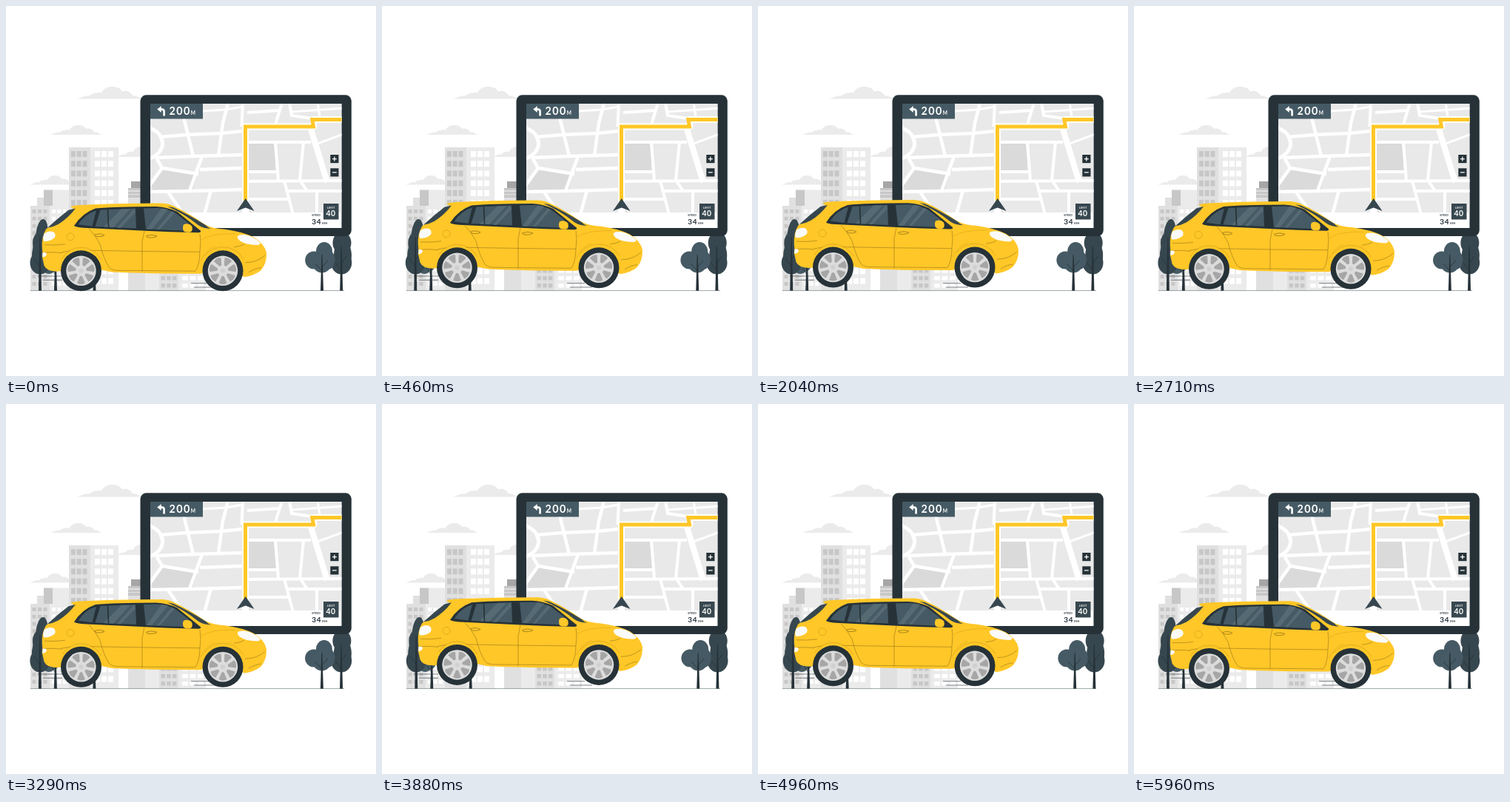
An HTML page with a canvas that plays this animation: 500 px wide and 500 px high, repeating every 6000 ms.

```html
<!DOCTYPE html>
<html lang="en">
<head>
<meta charset="utf-8">
<title>Navigation</title>
<style>
  html, body { margin: 0; width: 100%; height: 100%; overflow: hidden; background: #fff; }
  canvas { display: block; width: 100vmin; height: 100vmin; }
</style>
</head>
<body>
<canvas id="stage"></canvas>
<script>
const canvas = document.getElementById('stage');
const ctx = canvas.getContext('2d');
const LOOP = 6000, BOUNCE = 1500, LIFT = 6.5, REST = 0.8;
const SHAKE = [0, -1, 2, -4, 4, -4, 4, -4, 2, -1, 0];
const INK = '#263238', SLATE = '#37474f', STEEL = '#455a64', YELLOW = '#ffc727';
const G1 = '#ebebeb', G2 = '#e0e0e0', G3 = '#c7c7c7', G4 = '#a6a6a6';
const FONT = 'Lato, "Open Sans", sans-serif';

function rect(x, y, w, h, color) {
  ctx.fillStyle = color;
  ctx.fillRect(x, y, w, h);
}
function shape(d, color) {
  ctx.fillStyle = color;
  ctx.fill(new Path2D(d));
}
function line(d, color, width = 0.6) {
  ctx.strokeStyle = color;
  ctx.lineWidth = width;
  ctx.stroke(new Path2D(d));
}
function oval(x, y, rx, ry, color, tilt = 0) {
  ctx.fillStyle = color;
  ctx.beginPath();
  ctx.ellipse(x, y, rx, ry, tilt, 0, Math.PI * 2);
  ctx.fill();
}
function text(s, x, y, size, color, gap = 0) {
  ctx.font = `700 ${size}px ${FONT}`;
  ctx.letterSpacing = gap + 'px';
  ctx.fillStyle = color;
  ctx.fillText(s, x, y);
}
function panes(x, y, cols, rows, w, h, dx, dy, color) {
  for (let r = 0; r < rows; r++)
    for (let c = 0; c < cols; c++) rect(x + c * dx, y + r * dy, w, h, color);
}

function cloud(x, y, w, h) {
  ctx.save();
  ctx.translate(x, y);
  ctx.scale(w, h);
  shape('M0 0C.08-.1 .12-.3 .2-.25C.25-.5 .33-.55 .38-.5C.42-.85 .48-1 .56-1' +
    'C.65-1 .68-.75 .71-.62C.78-.72 .84-.55 .86-.28C.92-.28 .97-.12 1 0Z', G1);
  ctx.restore();
}

function city() {
  cloud(95.5, 125.5, 87.5, 16.5);
  cloud(59.5, 174, 69, 13);
  cloud(149, 204, 60, 14);
  cloud(32, 241.5, 62, 12.5);

  rect(42, 259, 12, 12, G2);
  rect(51, 248.5, 12, 22, G3);
  rect(63, 248.5, 22, 40, G1);
  rect(33, 270, 26, 114.5, G2);
  rect(59, 270, 26, 114.5, G1);
  panes(35.5, 275, 3, 11, 5, 5, 7.5, 9.8, G3);
  panes(62, 275, 3, 11, 5, 5, 7.5, 9.8, '#fff');

  rect(85, 191, 29, 193.5, G2);
  rect(114, 191, 38, 193.5, G1);
  panes(88, 196, 3, 14, 5.8, 8, 7.8, 13.2, G3);
  panes(120, 196, 3, 14, 7, 8, 9, 13.2, '#fff');

  rect(169, 237, 26, 9, G4);
  rect(165, 246, 23, 138.5, G2);
  rect(165, 246, 30, 3, G3);
  rect(165, 251, 30, 8, G3);
  rect(165, 254, 30, 1.2, G2);
  rect(188, 262, 19, 122.5, G1);
  rect(207, 330, 26, 54.5, G2);
  rect(233, 330, 37, 54.5, G1);
  panes(209.5, 335, 3, 5, 5.5, 5.5, 7.7, 10, G3);
  panes(238, 335, 3, 5, 8, 5.5, 10.5, 10, '#fff');
}

function map() {
  rect(195, 132, 258.5, 168, '#fff');
  ctx.save();
  ctx.beginPath();
  ctx.rect(195, 132, 258.5, 168);
  ctx.clip();
  rect(195, 132, 258.5, 147, '#e9e9e9');
  shape('M212 221L258 229L252 249L198 249L197 243Z', '#dadada');
  shape('M328 185L362 185L365 222L328 222Z', '#dadada');

  ctx.lineJoin = 'round';
  line('M190 208C211 201 215 187 209 177C207 171 201 167 190 163', '#fff', 5);
  line('M208 177L243 174L290 172L320 169', '#fff', 4.5);
  line('M240 150L253 203', '#fff', 4.5);
  line('M203 205L253 203L320 201', '#fff', 4.5);
  line('M203 205L211 219M265 203L248 250', '#fff', 4.5);
  line('M190 248L211 219L260 227M262 221L320 219', '#fff', 4.5);
  line('M190 251L252 250L320 248M277 249L268 282', '#fff', 4.5);
  line('M218 250L240 282M300 131L293 158L287 202', '#fff', 4.5);
  line('M265 142L298 140L320 136', '#fff', 3);
  line('M320 130L318.5 163', '#fff', 4);
  line('M323.5 160V282', '#fff', 9);
  line('M319 163H416V153.5H456', '#fff', 9);
  line('M323 184H412M328 224L366 224M323 237L456 236', '#fff', 4);
  line('M364 184L368 236M402 184L397 236', '#fff', 4);
  line('M411 163L434 238', '#fff', 8);
  line('M373 131L363 163M383 131L386 148L414 152M326 144L370 141', '#fff', 4);
  line('M421 186L456 173M386 143L456 138M421 131L424 150', '#fff', 3);
  line('M323 261L382 261M376 236L388 282M380 250L456 250', '#fff', 4);
  line('M420 250V282M399 238L407 250', '#fff', 4);
  ctx.lineJoin = 'miter';
  line('M323.5 266V163H415.5L413.8 153.6H455', YELLOW, 5);
  ctx.restore();
  shape('M323.7 260L335.5 277L323.7 272.5L312 277Z', SLATE);
}

function screen() {
  ctx.fillStyle = INK;
  ctx.beginPath();
  ctx.roundRect(181.5, 120.3, 285.3, 190.7, 8);
  ctx.fill();
  map();

  rect(195, 132, 71, 20.5, STEEL);
  ctx.lineJoin = 'round';
  line('M213.6 148.5V142.5Q213.6 139.6 210.5 139.6H208', '#fff', 2.6);
  shape('M204.2 139.6L209.8 135.2V144Z', '#fff');
  ctx.lineJoin = 'miter';
  text('200', 220.6, 147.3, 14.4, '#fff', 1.4);
  text('M', 249.8, 147.3, 6.6, '#fff');

  rect(438.3, 201, 11.2, 11.2, INK);
  rect(438.3, 219.3, 11.2, 11.2, INK);
  line('M441 206.6H446.8M443.9 203.7V209.5M441 224.9H446.8', '#fff', 1.3);

  rect(411, 279, 19, 20, '#fff');
  rect(429, 267, 20.5, 21.5, SLATE);
  text('LIMIT', 434, 273.6, 3.4, '#fff', 0.3);
  text('40', 432.4, 284.4, 10.4, '#fff', 0.5);
  text('SPEED', 413.3, 284.4, 3.4, INK, 0.3);
  text('34', 413.2, 295.2, 10, INK, 0.8);
  text('MH', 427, 295.2, 4, INK, 0.5);
}

function trunk(x, top) {
  shape(`M${x - 0.5} ${top}H${x + 0.5}L${x + 2} 384.8H${x - 2}Z`, INK);
}

function trees() {
  oval(64, 341, 11, 18, STEEL);
  oval(58, 348, 11, 14, STEEL);
  trunk(67, 335);
  trunk(119.5, 345);
  oval(48.5, 308, 8, 20, SLATE, 0.1);
  oval(43.5, 321, 7.5, 14, SLATE);
  oval(46.5, 337, 11.5, 20, SLATE);
  oval(46, 347, 13.5, 15.5, SLATE);
  trunk(46, 312);
  line('M46 352L38 341M46 343L53 333M67 363L61 354', INK, 0.8);

  oval(454, 320, 12.5, 15, SLATE);
  oval(455, 337, 12, 20, SLATE);
  oval(453.3, 347, 14, 15.5, SLATE);
  trunk(453.2, 325);
  line('M453 357L445 347M453 348L460 338', INK, 0.8);
  oval(430, 331.5, 11, 12.5, STEEL);
  oval(416, 343.5, 11.8, 12, STEEL);
  oval(427, 347, 13, 13.5, STEEL);
  oval(435, 343, 9.7, 13, STEEL);
  trunk(427, 336);
  line('M427 358L418 348M427 353L435 344', INK, 0.8);
}

function wheel(x) {
  const y = 357;
  oval(x, y, 27.5, 27.5, INK);
  oval(x, y, 20.2, 20.2, '#dcdcdc');
  ctx.save();
  ctx.translate(x, y);
  for (let i = 0; i < 7; i++) {
    ctx.save();
    ctx.rotate((i + 0.5) * Math.PI * 2 / 7);
    shape('M-1.6-7.5L-5.4-16.8Q0-20 5.4-16.8L1.6-7.5Q0-6.6-1.6-7.5Z', G4);
    ctx.restore();
  }
  ctx.restore();
  oval(x, y, 3, 3, '#d0d0d0');
}

function car() {
  shape('M87 270.5Q89 268.3 112 267.6Q168 265.6 211 265.8Q220 266.2 228 270.2' +
    'Q247 279 269 294.5Q279 300 296 301Q320 304.3 335 311.7Q350 321 352 333' +
    'Q352.6 347 344.5 356.5Q336 363.5 322 365.5L293 352L263 361' +
    'Q190 361 143 358.8L101 350L74 357.5' +
    'Q56 359.5 51.5 350L48.8 338Q50 332 48.8 326Q48 311 54 301' +
    'Q60 296 71 288L91 272.5Z', YELLOW);

  // glass
  shape('M94 272.8L84.5 275Q70 286 56 299Q64 298 71 294Q84 286 94 272.8Z', SLATE);
  shape('M92 296.3Q103 279 121 272.8Q146 270.3 203 270.2Q219 271.2 231 277' +
    'L263 303Q264 305.3 260 305.5Q220 304.8 188 303L105 299Q93 298 92 296.3Z', INK);
  shape('M97.5 294.5Q107 280 122 275.5L116.5 297Z', STEEL);
  shape('M127.5 274.8L175 272.6L176 299.8L120.5 297.2Z', STEEL);
  shape('M186 272.6L205 272.2Q218 273 229 279L246 292Q248 298 245 303L189 300.6Z', STEEL);
  shape('M156 273.5H168L145 298.4L132 297.8Z', '#566a74');
  shape('M173 273L175 278L155 299H150Z', '#566a74');
  shape('M210 272.4L219 274.2L197 300.6H190Z', '#566a74');
  shape('M224 276.5L228 278.8L208 301H204Z', '#566a74');
  line('M137.5 274L138.5 298', INK, 1.6);
  shape('M218 270L226 271.5Q247 281 270 295.5Q273 299 277 300.2Q267 300 260 295.5Q241 280 218 270Z', SLATE);
  shape('M240 294.5Q247 291.5 251 296.5Q253 301.5 250 304.5Q244 306 240 303.5Q238 298.5 240 294.5Z', YELLOW);

  // seams and handles
  const seam = '#96751b', soft = '#d9a71e';
  line('M112 300Q121 309 127 321Q132 341 139 352Q142 356 150 356.5L256 357.5Q262 348 262 331Q264 317 262 307', seam);
  line('M187 303L184 318V358M75 332L87 330M114 329.5Q190 331 262 331.5', seam);
  line('M119.5 308.5Q126 305.5 133 309Q130 311.5 122 310.5ZM189.5 310Q197 307 204 310Q201 313 191 312Z', seam, 0.8);
  line('M52 322Q66 323 80 321M49 333Q60 331 76 333M308 325Q318 324 322 321', seam);
  line('M264 315Q278 306 310 307M263 344Q269 329 283 324', soft);
  line('M323 346Q339 346 350 336M328 359Q338 353 345 353', seam);
  line('M76 340Q86 325.5 101 325.5Q119 325.5 129 342M268 337Q279 325 293 325Q311 325 321 341', soft, 0.8);
  ctx.strokeStyle = soft;
  ctx.beginPath();
  ctx.arc(87, 311, 5, 0, Math.PI * 2);
  ctx.stroke();

  // lights
  shape('M52 306.5Q58 302 64 304.5Q68 307.5 66 312Q60 318 51 317Q49 312.5 52 306.5Z', '#fafafa');
  shape('M49.3 332.5Q54.5 331.5 55 334.5Q54 338.5 49.3 338.5Z', '#fafafa');
  shape('M313 310.5Q315 307.5 324 308.5Q335 311 343.5 319Q344 322 339 322.3Q324 322 316 316.5Q312 313 313 310.5Z', '#fafafa');

  wheel(101.5);
  wheel(293);
}

function shakeAt(t) {
  const p = t / LOOP * 10, i = Math.floor(p);
  return SHAKE[i] + (SHAKE[i + 1] - SHAKE[i]) * (p - i);
}

function draw(t) {
  rect(0, 0, 500, 500, '#fff');
  city();
  line('M33 384.6H457', '#5c686e', 0.6);

  ctx.save();
  ctx.translate(shakeAt(t), 0);
  trees();
  ctx.restore();
  screen();

  line('M43 365H76M50 370.3H76M250 374.7H274M254 380H284', INK, 0.6);

  const p = t % BOUNCE / BOUNCE;
  ctx.save();
  ctx.translate(0, REST - LIFT * (1 - Math.abs(2 * p - 1)));
  car();
  ctx.restore();
}

function resize() {
  const side = Math.min(innerWidth, innerHeight) || 500;
  canvas.width = canvas.height = Math.round(side * (devicePixelRatio || 1));
}
addEventListener('resize', resize);
resize();

const start = performance.now();
function tick() {
  const s = canvas.width / 500;
  ctx.setTransform(s, 0, 0, s, 0, 0);
  draw((performance.now() - start) % LOOP);
  requestAnimationFrame(tick);
}
tick();
</script>
</body>
</html>
```
